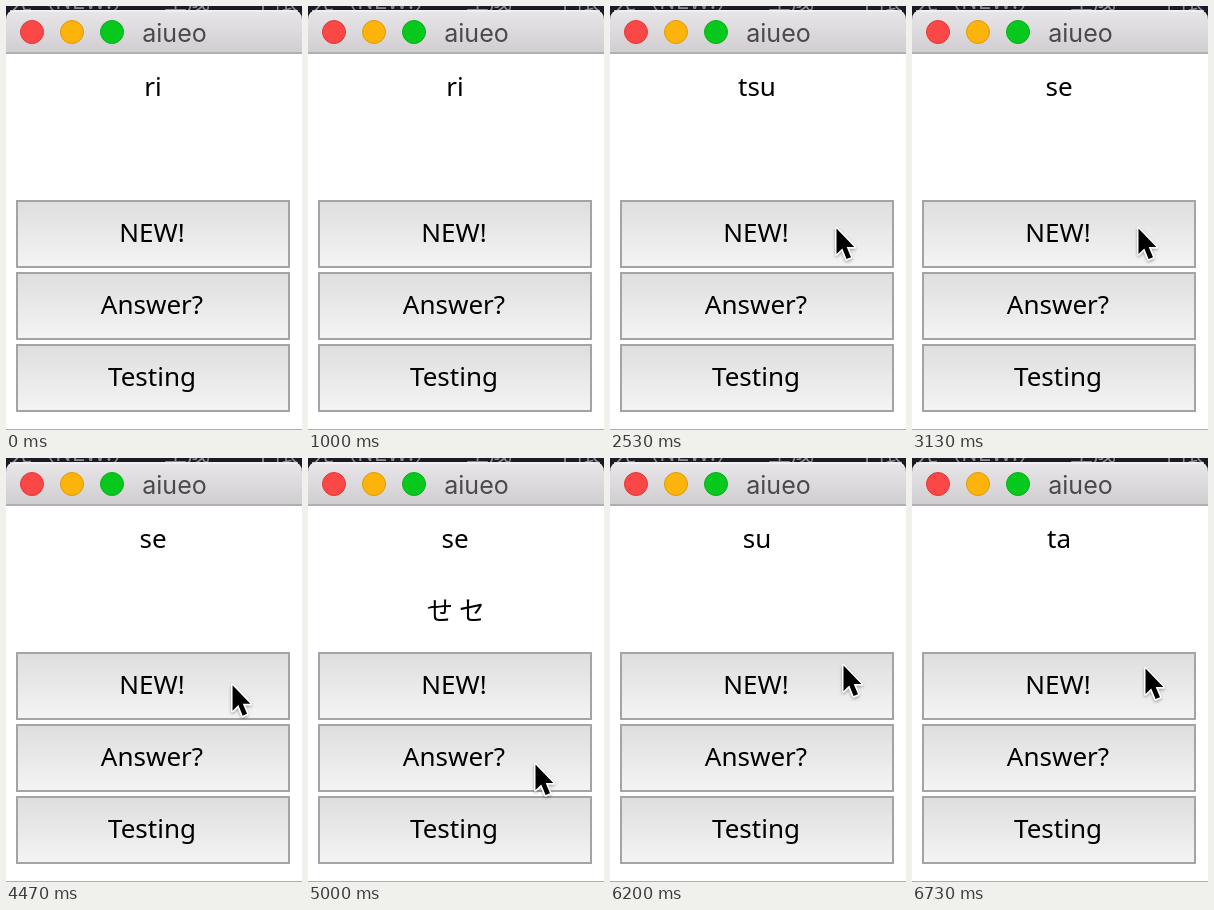
An HTML page that plays this animation: 296 px wide and 424 px high, repeating every 8000 ms.

```html
<!DOCTYPE html>
<html lang="ja">
<head>
<meta charset="utf-8">
<title>aiueo</title>
<style>
  html, body { margin: 0; width: 100%; height: 100%; overflow: hidden; background: #fff; }
  svg { display: block; width: 296px; height: 424px; }
  text { text-anchor: middle; font: 26px "Noto Sans", "Open Sans", sans-serif; fill: #000; }
  .title { font: 25px Inter, Roboto, sans-serif; fill: #4b494b; }
  .behind { font: 23px "Noto Sans CJK JP", "Noto Sans CJK", sans-serif; fill: #8d8a95; text-anchor: start; }
  .kana { font-family: "Noto Sans CJK JP", "Noto Sans CJK", sans-serif; }
</style>
</head>
<body>
<svg viewBox="0 0 296 424">
  <defs>
    <linearGradient id="bar" x2="0" y2="1">
      <stop stop-color="#e8e6e8"/><stop offset="1" stop-color="#cfcdcf"/>
    </linearGradient>
    <linearGradient id="face" x2="0" y2="1">
      <stop stop-color="#dedede"/><stop offset="1" stop-color="#f4f4f4"/>
    </linearGradient>
    <filter id="shadow" x="-50%" y="-50%" width="200%" height="200%">
      <feDropShadow dx="0" dy="1.5" stdDeviation="1.5" flood-opacity=".35"/>
    </filter>
  </defs>
  <rect width="296" height="424" fill="#fff"/>
  <rect width="296" height="16" fill="#1d1925"/>
  <g class="behind">
    <text class="behind" x="4" y="3">え</text>
    <text class="behind" x="26" y="3">（NEW!）</text>
    <text class="behind" x="158" y="3">生成</text>
    <text class="behind" x="246" y="3">下限</text>
  </g>
  <path d="M0 48V14Q0 4 10 4H286Q296 4 296 14V48Z" fill="url(#bar)"/>
  <path d="M4 5H292" stroke="#f5f4f5" stroke-width="1.5"/>
  <path d="M0 47H296" stroke="#b1afb1" stroke-width="2"/>
  <g stroke-width="1">
    <circle cx="26" cy="26" r="11.5" fill="#fc4747" stroke="#e0383a"/>
    <circle cx="66" cy="26" r="11.5" fill="#fdb40a" stroke="#dd9a08"/>
    <circle cx="106" cy="26" r="11.5" fill="#06c81d" stroke="#0aad1b"/>
  </g>
  <text class="title" x="168.5" y="36">aiueo</text>
  <text id="question" x="147" y="90"></text>
  <text id="answer" class="kana" x="148" y="162">せ セ</text>
  <g id="buttons"></g>
  <path d="M0 423.5H296" stroke="#aeaeae"/>
  <g id="cursor" filter="url(#shadow)">
    <path d="M1.5 2.5V28L7.3 22.4L11.6 33L16 31.2L11.7 21H19.3Z"
          stroke="#fff" stroke-width="3" paint-order="stroke" stroke-linejoin="round"/>
  </g>
</svg>
<script>
const LOOP = 8000, STEP = 1000 / 15;
const $ = id => document.getElementById(id);

$('buttons').innerHTML = ['NEW!', 'Answer?', 'Testing'].map((label, i) => `
  <g transform="translate(0 ${i * 72})">
    <rect x="11" y="195" width="272" height="66" stroke="#a4a4a4" stroke-width="2"/>
    <text x="146" y="236">${label}</text>
  </g>`).join('');
const faces = $('buttons').querySelectorAll('rect');

// All times below count steps of 1/15 s.
const questions = [[0, 'ri'], [38, 'tsu'], [47, 'se'], [93, 'su'], [101, 'ta']];
const presses = [[37, 38, 0], [46, 47, 0], [74, 75, 1], [91, 93, 0], [100, 101, 0]];
const smooth = p => p * p * (3 - 2 * p);
const slowing = p => 1 - (1 - p) ** 2;
const moves = [
  { from: 25, to: 31, a: [300, 230], b: [223, 219], ease: slowing },
  { from: 33, to: 35, a: [223, 219], b: [225, 220], ease: smooth },
  { from: 66, to: 73, a: [225, 220], b: [226, 304], ease: smooth },
  { from: 78, to: 89, a: [226, 304], b: [232, 205], ease: smooth },
  { from: 98, to: 99, a: [232, 205], b: [232, 208], ease: smooth }
];

function cursorAt(n) {
  const { from, to, a, b, ease } = moves.findLast(m => n >= m.from) || moves[0];
  const p = ease(Math.min(1, Math.max(0, (n - from) / (to - from))));
  return a.map((v, i) => v + (b[i] - v) * p);
}

function render(ms) {
  const n = Math.floor((ms + 4) / STEP);
  $('question').textContent = questions.findLast(q => n >= q[0])[1];
  $('answer').style.display = n >= 75 && n < 93 ? '' : 'none';
  const pressed = presses.find(([on, off]) => n >= on && n < off);
  faces.forEach((face, i) =>
    face.setAttribute('fill', pressed && pressed[2] === i ? '#d2d2d2' : 'url(#face)'));
  $('cursor').setAttribute('transform', `translate(${cursorAt(n)})`);
}

const start = performance.now();
function tick() {
  render((performance.now() - start) % LOOP);
  requestAnimationFrame(tick);
}
tick();
</script>
</body>
</html>
```
